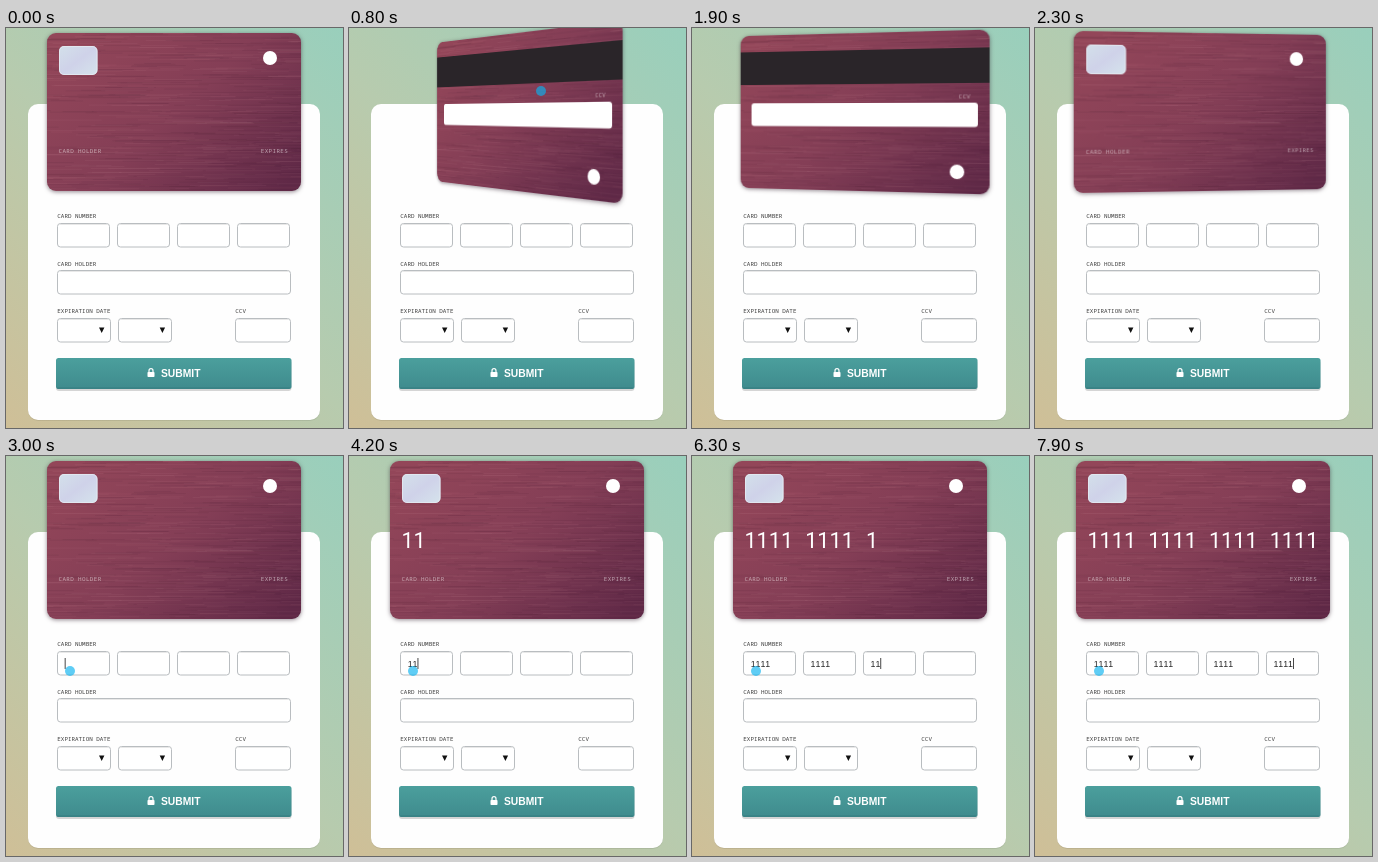
Recreate the animation shown at these times as an HTML page. Size 337 by 400 pixels, loop 8000 ms.

```html
<!DOCTYPE html>
<html lang="en">
<head>
<meta charset="utf-8">
<title>Card form</title>
<style>
html, body { margin: 0; width: 100%; height: 100%; overflow: hidden; }
body { background: linear-gradient(45deg, #cfbf97 0%, #b7cbae 48%, #99cfbc 100%); }
#stage { position: absolute; left: 0; top: 0; width: 337px; height: 400px; overflow: hidden; }
#stage > svg { position: absolute; left: 0; top: 0; }
#scene { position: absolute; left: 41px; top: 5px; width: 254px; height: 158px; perspective: 635px; }
#card { display: block; overflow: visible; filter: drop-shadow(0 1px 2px rgba(40, 20, 35, .5)); }
#dot { position: absolute; left: -5px; top: -5px; width: 10px; height: 10px; border-radius: 50%; background: rgba(9, 178, 240, .65); }
text { white-space: pre; }
.mono { font: 5.92px "Noto Sans Mono", monospace; fill: #3c3c3c; }
.note { fill: #fff; fill-opacity: .55; letter-spacing: .37px; }
.field { font: 8.8px "Liberation Sans", Arial, sans-serif; font-kerning: none; fill: #222; }
.digit { font: 21.6px Roboto, sans-serif; fill: #fff; text-anchor: middle; }
.submit { font: bold 10.3px "Liberation Sans", Arial, sans-serif; fill: #fff; }
</style>
</head>
<body>
<div id="stage">
  <svg id="form" width="337" height="400" viewBox="0 0 337 400">
    <defs>
      <linearGradient id="teal" x1="0" y1="0" x2="0" y2="1">
        <stop offset="0" stop-color="#4b9f9d"/><stop offset="1" stop-color="#3f8b8d"/>
      </linearGradient>
    </defs>
    <rect x="22" y="77" width="292" height="316" rx="10" fill="#000" opacity=".08"/>
    <rect x="22" y="76" width="292" height="316" rx="10" fill="#fefefe"/>
    <g id="boxes"></g>
    <g id="labels"></g>
    <path d="M93 299.5h5.4l-2.7 5.5zM153.700 299.500h5.400l-2.700 5.500z" fill="#111"/>
    <rect x="50" y="332" width="235.500" height="31" rx="3" fill="#000" opacity=".16"/>
    <rect x="50" y="330" width="235.500" height="31" rx="2.500" fill="url(#teal)"/>
    <path d="M51 360h233" stroke="#357b7e" stroke-width="1"/>
    <rect x="141.500" y="344" width="7" height="5" rx=".8" fill="#fff"/>
    <path d="M143 344.500v-1.800a2 2 0 0 1 4 0v1.800" fill="none" stroke="#fff" stroke-width="1.200"/>
    <text class="submit" x="155" y="349">SUBMIT</text>
    <g id="typed"></g>
    <rect id="caret" y="202" width=".9" height="11" fill="#333"/>
  </svg>
  <div id="scene">
    <svg id="card" width="254" height="158" viewBox="41 5 254 158">
      <defs>
        <linearGradient id="wine" gradientUnits="userSpaceOnUse" x1="85" y1="-10" x2="255" y2="180">
          <stop offset="0" stop-color="#934659"/><stop offset=".5" stop-color="#843e56"/><stop offset="1" stop-color="#602947"/>
        </linearGradient>
        <linearGradient id="foil" x1="0" y1="0" x2="1" y2="1">
          <stop offset="0" stop-color="#d3e0ea"/><stop offset=".5" stop-color="#cfd2e9"/><stop offset="1" stop-color="#d5e3ec"/>
        </linearGradient>
        <clipPath id="edge"><rect x="41" y="5" width="254" height="158" rx="9"/></clipPath>
      </defs>
      <g clip-path="url(#edge)">
        <rect x="41" y="5" width="254" height="158" fill="url(#wine)"/>
        <path id="light" stroke="#ffc4c4" stroke-opacity=".07" stroke-width=".7"/>
        <path id="dark" stroke="#300c28" stroke-opacity=".1" stroke-width=".7"/>
        <g id="back">
          <rect x="41" y="22" width="254" height="34" fill="#2a2529"/>
          <rect x="53" y="75" width="231" height="23.500" rx="3" fill="#fff"/>
          <text class="mono note" x="265.500" y="71">CCV</text>
          <circle cx="264" cy="142" r="7" fill="#fff"/>
        </g>
        <g id="front">
          <rect x="53" y="18" width="38.500" height="29" rx="5" fill="url(#foil)"/>
          <rect x="53.500" y="18.500" width="37.500" height="28" rx="4.500" fill="none" stroke="#e9edf3" stroke-opacity=".7"/>
          <circle cx="264" cy="30" r="7" fill="#fff"/>
          <text class="mono note" x="52.500" y="125.300">CARD HOLDER</text>
          <text class="mono note" x="254.800" y="125.300">EXPIRES</text>
          <g id="number"></g>
        </g>
      </g>
    </svg>
  </div>
  <div id="dot"></div>
</div>
<script>
const LOOP = 8000, STEP = 100, FLIP = 600, LAG = 100;
const keys = [
  [3900, 4100, 4300, 4400],
  [5000, 5200, 5400, 5600],
  [6000, 6300, 6500, 6700],
  [7000, 7200, 7400, 7800]
];
const $ = id => document.getElementById(id);

function add(parent, tag, attrs, text = '') {
  const el = document.createElementNS('http://www.w3.org/2000/svg', tag);
  for (const k in attrs) el.setAttribute(k, attrs[k]);
  el.textContent = text;
  return $(parent).appendChild(el);
}

function box(x, y, width, height = 23.5) {
  add('boxes', 'rect', { x: x + .5, y: y + .5, width, height, rx: 3, fill: '#fff', stroke: '#b9bdc0' });
  add('boxes', 'path', { d: `M${x + 3} ${y + 1.5}h${width - 5}`, stroke: '#000', 'stroke-opacity': .09 });
}

const label = (x, y, text) => add('labels', 'text', { x, y, class: 'mono' }, text);

for (let i = 0; i < 4; i++) box(51 + 60 * i, 195, 52);
box(51, 242, 233);
box(51, 290, 53);
box(112, 290, 53);
box(229, 290, 55);
label(51.3, 190, 'CARD NUMBER');
label(51.3, 237.6, 'CARD HOLDER');
label(51.3, 285.2, 'EXPIRATION DATE');
label(229.3, 285.2, 'CCV');

// brushed metal grain
let seed = 7;
const rnd = () => (seed = seed * 16807 % 2147483647) / 2147483647;
for (const id of ['light', 'dark']) {
  let d = '';
  for (let i = 0; i < 260; i++)
    d += `M${(rnd() * 300 + 10).toFixed(1)} ${(5 + rnd() * 158).toFixed(1)}h${(20 + rnd() * 60).toFixed(1)}`;
  $(id).setAttribute('d', d);
}

const fieldX = g => 58.7 + 59.9 * g;
const fields = keys.map((_, g) => add('typed', 'text', { x: fieldX(g), y: 211, class: 'field' }));
const digits = keys.map((_, g) => _.map((_, i) =>
  add('number', 'text', { x: 58.5 + 12.15 * (5 * g + i), y: 92, class: 'digit' }, '1')));

const clamp = v => Math.min(1, Math.max(0, v));
const bez = (u, a, b) => 3 * u * (1 - u) ** 2 * a + 3 * u * u * (1 - u) * b + u ** 3;

// the CSS "ease" curve
function ease(p) {
  let lo = 0, hi = 1;
  for (let i = 0; i < 24; i++) {
    const m = (lo + hi) / 2;
    if (bez(m, .25, .25) < p) lo = m; else hi = m;
  }
  return bez(lo, .1, 1);
}

const flip = (t, start) => ease(clamp((t - start) / FLIP));

function pointer(t) {
  const move = (start, len, x0, y0, x1, y1) => {
    const p = clamp((t - start) / len), s = p * (2 - p);
    return [x0 + (x1 - x0) * s, y0 + (y1 - y0) * s];
  };
  if (t < 400 || (t >= 1900 && t < 2700)) return null;
  if (t < 1800) return move(350, 400, 345, 110, 192, 63);
  if (t < 1900) return move(1750, 100, 192, 63, 200, -8);
  return move(2650, 350, -8, 290, 64, 215);
}

function draw(t) {
  const turn = 180 * (flip(t, 527) - flip(t, 1852));
  const back = turn > 90;
  $('card').style.transform = `rotateY(${back ? turn - 180 : turn}deg)`;
  $('back').style.display = back ? '' : 'none';
  $('front').style.display = back ? 'none' : '';

  let focus = 0, last = 3000;
  keys.forEach((times, g) => {
    const count = times.filter(k => k <= t).length;
    fields[g].textContent = '1'.repeat(count);
    times.forEach((k, i) => {
      digits[g][i].style.display = t >= k + LAG ? '' : 'none';
      if (t >= k) last = k;
    });
    if (g < 3 && t >= times[3] + LAG) {
      focus = g + 1;
      last = times[3] + LAG;
    }
  });
  const on = t >= 3000 && (t - last) % 1000 < 500;
  $('caret').style.display = on ? '' : 'none';
  $('caret').setAttribute('x', fieldX(focus) + 4.9 * fields[focus].textContent.length);

  const p = pointer(t);
  $('dot').style.display = p ? '' : 'none';
  if (p) $('dot').style.transform = `translate(${p[0]}px, ${p[1]}px)`;
}

const origin = performance.now();
function tick() {
  const t = (performance.now() - origin + 5) % LOOP;
  draw(Math.floor(t / STEP) * STEP);
  requestAnimationFrame(tick);
}
tick();
</script>
</body>
</html>
```
